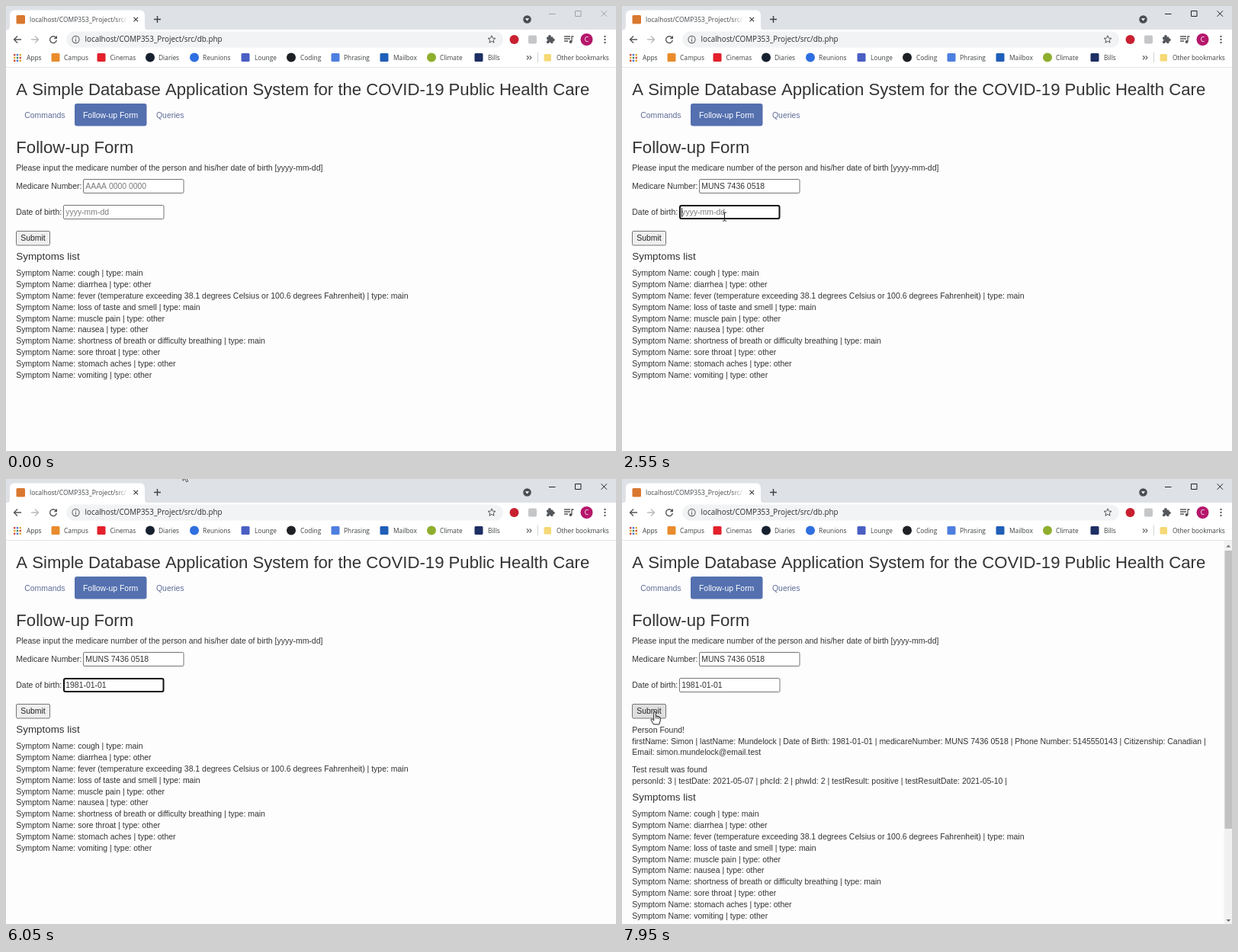
An HTML page with a canvas that plays this animation: 800 px wide and 584 px high, repeating every 8 s.

```html
<!DOCTYPE html>
<html lang="en">
<head>
<meta charset="utf-8">
<title>Follow-up Form</title>
<style>
html, body { margin: 0; width: 100%; height: 100%; overflow: hidden; background: #fefdfe; }
canvas { display: block; width: 800px; height: 584px; }
</style>
</head>
<body>
<canvas id="stage" width="800" height="584"></canvas>
<script>
const c = document.getElementById('stage').getContext('2d', { alpha: false });
const LOOP = 8000;
const PAGE = '"Liberation Sans", Arial, sans-serif';
const CHROME = '"Open Sans", "Noto Sans", sans-serif';
const BODY = 10.47, HEAD = 22.15, INPUT = 10.42;
const INK = '#333', ICON = '#54575b';

const CARD = 'MUNS 7436 0518';
const BIRTH = '1981-01-01';
const KEY_TIMES = [3550, 3700, 3800, 3950, 4200, 4600, 4700, 4800, 4850, 4950];
const FOCUS_CARD = 1050, PASTE = 1850, FOCUS_DATE = 2350, PRESS = 7000, RESULT = 7150;

const BOOKMARKS = [
  // label, text x, icon x, icon colour, round icon
  ['Campus', 76, 65, '#e98b2c', 0],
  ['Cinemas', 136.5, 125, '#e3202b', 0],
  ['Diaries', 200, 189, '#16202e', 1],
  ['Reunions', 258, 247, '#2f6fe0', 1],
  ['Lounge', 326, 314, '#4a5fc4', 0],
  ['Coding', 386, 374, '#1d2024', 1],
  ['Phrasing', 443, 432, '#4d7fe0', 0],
  ['Mailbox', 508, 496, '#1f5fb8', 0],
  ['Climate', 569, 558, '#8fae2e', 1],
  ['Bills', 632, 620, '#1d2f63', 0]
];
const SYMPTOMS = [
  ['cough', 'main'], ['diarrhea', 'other'],
  ['fever (temperature exceeding 38.1 degrees Celsius or 100.6 degrees Fahrenheit)', 'main'],
  ['loss of taste and smell', 'main'], ['muscle pain', 'other'], ['nausea', 'other'],
  ['shortness of breath or difficulty breathing', 'main'], ['sore throat', 'other'],
  ['stomach aches', 'other'], ['vomiting', 'other']
];
// time, x, y of the pointer's hot spot
const TRACK = [
  [900, 170, -15], [1050, 130, 237], [2100, 130, 237], [2300, 134, 276],
  [5850, 134, 276], [6050, 232, -10], [6150, 232, -10], [6650, 49, 302], [6750, 43, 306]
];
const CARD_BOX = [101, 227, 132.5, 19], DATE_BOX = [75, 261, 132.5, 19], BUTTON = [13, 295, 45, 19.5];

function text(s, x, y, size, color = INK, font = PAGE) {
  c.font = size + 'px ' + font;
  c.fillStyle = color;
  c.fillText(s, x, y);
}
function rect(x, y, w, h, color) {
  c.fillStyle = color;
  c.fillRect(x, y, w, h);
}
function round(x, y, w, h, r, fill, line, width = 1) {
  c.beginPath();
  c.roundRect(x, y, w, h, r);
  if (fill) { c.fillStyle = fill; c.fill(); }
  if (line) { c.strokeStyle = line; c.lineWidth = width; c.stroke(); }
}
function disc(x, y, r, color) {
  c.fillStyle = color;
  c.beginPath();
  c.arc(x, y, r, 0, 7);
  c.fill();
}
function path(d, x, y, line, width, fill, flip = 1) {
  const p = new Path2D(d);
  c.save();
  c.transform(flip, 0, 0, 1, x, y);
  if (fill) { c.fillStyle = fill; c.fill(p); }
  if (line) { c.strokeStyle = line; c.lineWidth = width; c.stroke(p); }
  c.restore();
}
const inside = (p, [x, y, w, h]) => p.x >= x && p.x <= x + w && p.y >= y && p.y <= y + h;

function pointer(t) {
  if (t < 900 || (t >= PASTE && t < 2100) || (t >= 3550 && t < 5850)) return null;
  let i = TRACK.length - 1;
  while (TRACK[i][0] > t) i--;
  const a = TRACK[i], b = TRACK[i + 1] || a;
  let k = b === a ? 0 : (t - a[0]) / (b[0] - a[0]);
  k = k * k * (3 - 2 * k);
  return { x: a[1] + (b[1] - a[1]) * k, y: a[2] + (b[2] - a[2]) * k };
}

function tabStrip(active) {
  rect(0, 0, 800, 32, '#dee1e6');
  round(5, 5.5, 177, 32, 6, '#fff');
  path('M0 32Q5 32 5 26V32ZM187 32Q182 32 182 26V32Z', 0, 0, null, 0, '#fff');
  round(13.5, 12, 11.5, 11.5, 1.5, '#d9782f');
  text('localhost/COMP353_Project/src/', 31, 21, 8.5, '#45494d', CHROME);
  const fade = c.createLinearGradient(144, 0, 161, 0);
  fade.addColorStop(0, 'rgba(255,255,255,0)');
  fade.addColorStop(1, '#fff');
  rect(144, 10, 18, 16, fade);
  path('M-2.8-2.8L2.8 2.8M2.8-2.8L-2.8 2.8', 170.3, 17.6, '#3c4043', 1.2);
  path('M-4.5 0H4.5M0-4.5V4.5', 198.5, 17.5, '#3c4043', 1.4);
  disc(683.5, 17.5, 5.3, '#4b4f54');
  path('M-2.6-1.3H2.6L0 2Z', 683.5, 17.5, null, 0, '#fff');
  const line = active ? '#222' : '#a0a2a6';
  path('M712 10.5H720.5M746.5 6.5H754V13.5H746.5ZM780.5 6.3L788 13.8M788 6.3L780.5 13.8', 0, 0, line, 1);
}

function toolbar() {
  rect(0, 31, 800, 50, '#fff');
  rect(0, 80, 800, 1, '#e3e4e6');
  const arrow = 'M5 0H-4.5M0-4.5L-4.5 0L0 4.5';
  path(arrow, 15, 44, ICON, 1.4);
  path(arrow, 38, 44, '#b8babd', 1.4, null, -1);
  path('M3.2-2.9A4.4 4.4 0 1 0 4.3 1', 62, 44, ICON, 1.4);
  path('M5-5.2V-.8H.6Z', 62, 44, null, 0, ICON);

  round(79, 33.5, 573, 21, 10.5, '#f1f3f4');
  path('M4.6 0A4.6 4.6 0 1 1-4.6 0A4.6 4.6 0 1 1 4.6 0M0-.6V2.7M0-2.7V-1.5', 91.5, 44, '#5f6368', 1.1);
  text('localhost/COMP353_Project/src/db.php', 103.5, 47.4, 9.87, '#2b2e31', CHROME);

  let star = '';
  for (let i = 0; i < 10; i++) {
    const r = i % 2 ? 2.3 : 5.2, a = i * Math.PI / 5;
    star += (i ? 'L' : 'M') + (r * Math.sin(a)).toFixed(2) + ' ' + (-r * Math.cos(a)).toFixed(2);
  }
  path(star + 'Z', 637, 44, ICON, 1);
  disc(666.5, 44, 6, '#c8202f');
  round(685, 38.5, 11, 11, 2, '#c5c6c8');
  round(709, 40.5, 8.5, 8.5, 1, ICON);
  disc(713, 40, 1.9, ICON);
  disc(717.8, 44.5, 1.9, ICON);
  disc(709, 44.8, 1.4, '#fff');
  disc(713.2, 49, 1.4, '#fff');
  path('M-6-4H2M-6-1H2M-6 2H-1M4 3V-4H6.5', 738, 44, ICON, 1.3);
  disc(740.5, 47, 1.9, ICON);
  disc(761.5, 44, 8, '#b5176b');
  c.textAlign = 'center';
  text('C', 761.5, 47, 8.5, '#fff', CHROME);
  c.textAlign = 'left';
  for (const y of [40, 44, 48]) disc(785.5, y, 1.15, ICON);

  const dots = ['#d94a3d', '#4a8a50', '#e0a92e', '#4979d8'];
  for (let i = 0; i < 9; i++)
    rect(10 + i % 3 * 3.8, 63 + Math.floor(i / 3) * 3.8, 2.4, 2.4, dots[(i * 3 + (i / 3 | 0)) % 4]);
  const mark = (s, x) => text(s, x, 70.5, 8.4, '#3c4043', CHROME);
  mark('Apps', 27);
  for (const [label, x, ix, color, circle] of BOOKMARKS) {
    if (circle) disc(ix, 67.5, 6, color);
    else round(ix - 5.5, 62, 11, 11, 1.5, color);
    mark(label, x);
  }
  path('M-3-2.5L-.5 0L-3 2.5M.5-2.5L3 0L.5 2.5', 686, 67.8, ICON, 1.1);
  rect(697, 61, 1, 13, '#d0d3d6');
  round(705.5, 63, 9.5, 9.5, 1.5, '#f6d874');
  mark('Other bookmarks', 722);
}

function field([x, y, w, h], value, hint, focused, caret) {
  if (focused) round(x + 1, y + 1, w - 2, h - 2, 2, '#fff', '#101010', 2);
  else round(x + .5, y + .5, w - 1, h - 1, 1.5, '#fff', '#767676');
  const tx = x + 3.3, base = y + 13.2;
  text(value || hint, tx, base, INPUT, value ? INK : '#7a7a7a');
  if (focused && caret) rect(Math.round(tx + c.measureText(value).width), y + 4, 1, 12, '#222');
}

function page(t, hover) {
  text('A Simple Database Application System for the COVID-19 Public Health Care', 13.3, 116.5, HEAD);
  round(90, 128, 94.5, 29.5, 3, '#5470af');
  text('Commands', 24.3, 146.7, INPUT, '#5f6f97');
  text('Follow-up Form', 101, 146.7, INPUT, '#fff');
  text('Queries', 197, 146.7, INPUT, '#5f6f97');
  text('Follow-up Form', 13.3, 192.5, HEAD);
  text('Please input the medicare number of the person and his/her date of birth [yyyy-mm-dd]', 13.3, 215.7, BODY);
  text('Medicare Number:', 13.3, 240.2, BODY);
  text('Date of birth:', 13.3, 274.2, BODY);

  const typed = BIRTH.slice(0, KEY_TIMES.filter(k => t >= k).length);
  field(CARD_BOX, t >= PASTE ? CARD : '', 'AAAA 0000 0000',
    t >= FOCUS_CARD && t < FOCUS_DATE, t < 1500 || t >= PASTE);
  field(DATE_BOX, typed, 'yyyy-mm-dd',
    t >= FOCUS_DATE && t < PRESS, t < 2850 || (t >= 3300 && t < 5200));

  const [x, y, w, h] = BUTTON;
  round(x + .5, y + .5, w - 1, h - 1, 1.5, hover ? '#dfdfdf' : '#efefef', '#767676');
  text('Submit', 19.2, 308.3, INPUT, '#222');

  let shift = 0;
  if (t >= RESULT) {
    shift = 89;
    const found = [
      ['Person Found!', 332.7],
      ['firstName: Simon | lastName: Mundelock | Date of Birth: 1981-01-01 | medicareNumber: ' + CARD +
        ' | Phone Number: 5145550143 | Citizenship: Canadian |', 347.6],
      ['Email: simon.mundelock@email.test', 362.4],
      ['Test result was found', 384.8],
      ['personId: 3 | testDate: 2021-05-07 | phcId: 2 | phwId: 2 | testResult: positive | testResultDate: 2021-05-10 |', 399.6]
    ];
    for (const [s, base] of found) text(s, 13.3, base, BODY);
    scrollbar();
  }
  text('Symptoms list', 13.3, 332.6 + shift, 13.4);
  SYMPTOMS.forEach(([name, type], i) =>
    text(`Symptom Name: ${name} | type: ${type}`, 13.3, 354.2 + shift + i * 14.83, BODY));
}

function scrollbar() {
  rect(789.5, 81, 10.5, 503, '#f1f1f1');
  rect(790.5, 94, 9.5, 365, '#c1c1c1');
  path('M-2.8 1.5L0-1.5L2.8 1.5Z', 795.3, 88, null, 0, '#666');
  path('M-2.8-1.5L0 1.5L2.8-1.5Z', 795.3, 579.5, null, 0, '#666');
}

function drawPointer(p, hover) {
  if (hover) {
    path('M-1.3 0Q0-1.2 1.3 0V5L3 5.2L5.2 5.8L7.3 7V11L5.8 16H-1.5L-5 10.2Q-4.8 8.6-3.3 9.3L-1.3 11Z',
      p.x, p.y, '#222', 1, '#fff');
    path('M1.4 5V8.5M3.3 5.5V8.7M5.3 6V9', p.x, p.y, '#222', .8);
  } else if (inside(p, CARD_BOX) || inside(p, DATE_BOX)) {
    path('M-2.5-5.5H-.7L0-5L.7-5.5H2.5M0-5V5M-2.5 5.5H-.7L0 5L.7 5.5H2.5', p.x + .5, p.y + .5, '#222', 1);
  } else {
    path('M0 0V12.2L2.8 9.6L4.7 13.8L6.6 13L4.8 8.9H8.7Z', p.x, p.y, '#222', .8, '#fff');
  }
}

function draw(t) {
  const p = pointer(t), hover = !!p && inside(p, BUTTON);
  rect(0, 0, 800, 584, '#fefdfe');
  tabStrip(t >= FOCUS_CARD);
  toolbar();
  page(t, hover);
  if (p) drawPointer(p, hover);
}

const start = performance.now();
function tick() {
  draw((performance.now() - start) % LOOP);
  requestAnimationFrame(tick);
}
tick();
</script>
</body>
</html>
```
